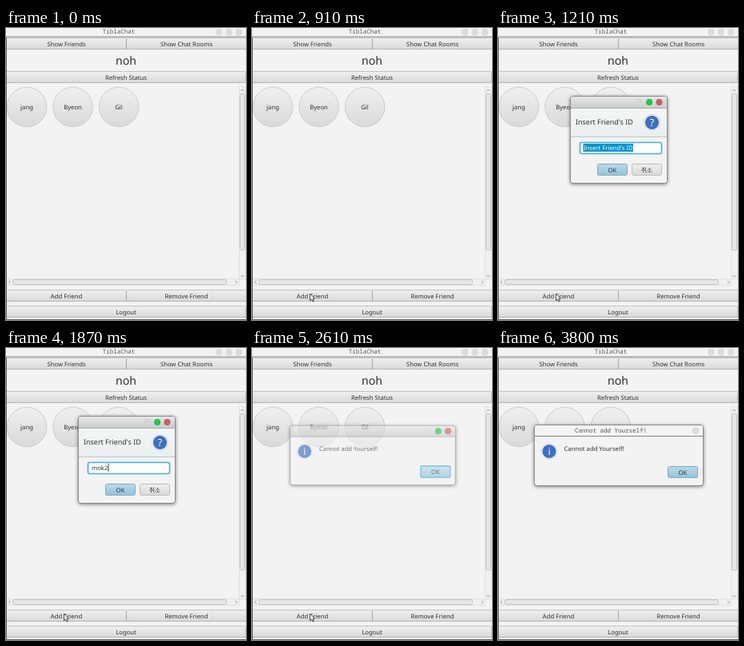
An HTML page for the animation above (3890 ms loop, 300 px wide and 366 px high).

```html
<!DOCTYPE html>
<html lang="en">
<head>
<meta charset="utf-8">
<title>Add friend</title>
<style>
  html, body { margin: 0; width: 100%; height: 100%; overflow: hidden; background: #f3f3f3; }
  svg { display: block; width: 300px; height: 366px; }
  text {
    font: 7.7px "Noto Sans", "Noto Sans CJK KR", sans-serif;
    fill: #333; white-space: pre; text-rendering: geometricPrecision;
  }
  text.mono { font-family: "Noto Sans Mono", monospace; font-size: 7.5px; fill: #555; }
  text.name { font-size: 14.4px; fill: #333; }
  text.head { font-size: 8.95px; }
  text.sign { font-size: 12.5px; font-weight: 500; fill: #fff; }
  .dialog { filter: drop-shadow(0 1px 2px rgba(0, 0, 0, .5)); }
</style>
</head>
<body>
<svg id="stage" viewBox="0 0 300 366">
  <defs>
    <linearGradient id="grey" x2="0" y2="1"><stop stop-color="#f0f0f0"/><stop offset="1" stop-color="#d9d9d9"/></linearGradient>
    <linearGradient id="blue" x2="0" y2="1"><stop stop-color="#b9dbea"/><stop offset="1" stop-color="#92c3dc"/></linearGradient>
    <linearGradient id="bar" x2="0" y2="1"><stop stop-color="#e6e6e6"/><stop offset="1" stop-color="#c9cccb"/></linearGradient>
    <linearGradient id="header" x2="0" y2="1"><stop stop-color="#f4f6f6"/><stop offset="1" stop-color="#e9eeee"/></linearGradient>
  </defs>
</svg>
<script>
const LOOP = 3890;
const stage = document.getElementById('stage');
const $ = id => document.getElementById(id);

const rect = (x, y, w, h, fill, stroke = 'none', r = 0, extra = '') =>
  `<rect x="${x}" y="${y}" width="${w}" height="${h}" rx="${r}" fill="${fill}" stroke="${stroke}" ${extra}/>`;
const circle = (x, y, r, fill, stroke = 'none') =>
  `<circle cx="${x}" cy="${y}" r="${r}" fill="${fill}" stroke="${stroke}"/>`;
const label = (x, y, string, cls = '', anchor = 'middle') =>
  `<text x="${x}" y="${y}" class="${cls}" text-anchor="${anchor}">${string}</text>`;
const line = (d, color, width = 1) =>
  `<path d="${d}" fill="none" stroke="${color}" stroke-width="${width}"/>`;

const button = (x, y, w, h, string, fill = 'url(#grey)', stroke = '#c2c2c2', r = 1) =>
  rect(x + .5, y + .5, w - 1, h - 1, fill, stroke, r) + label(x + w / 2, y + h / 2 + 3, string);

const wideButton = (x, y, w, string) =>
  button(x, y, w, 15, string) + line(`M${x} ${y + 14.5}h${w}`, '#b6b6b6');

const friend = (x, name) => circle(x, 99, 24.8, 'url(#grey)', '#cdcdcd') + label(x, 102, name);

// A title bar is coloured and untitled with focus, plain and titled without.
function titleBar(id, x, y, w, h, title, lastX, plainDots) {
  const cy = y + h / 2 - .5;
  const dots = colors => colors.map((c, i) =>
    circle(lastX - 12.4 * (colors.length - 1 - i), cy, 4, c, 'rgba(90,90,90,.06)')).join('');
  const shape = fill => `<path d="M${x} ${y + h}v${3 - h}q0-3 3-3h${w - 6}q3 0 3 3v${h - 3}z" fill="${fill}"/>`;
  const edge = color => line(`M${x} ${y + h - .5}h${w}`, color);
  return `<g id="${id}On">${shape('url(#bar)')}${edge('#a5aaa9')}${dots(['#d5d8d7', '#1fc645', '#c8605c'])}</g>
    <g id="${id}Off">${shape('#f3f3f3')}${edge('#858585')}${label(141, cy + 2.2, title, 'mono')}
    ${dots(Array(plainDots).fill('#dcdcdc'))}</g>`;
}

const icon = (x, y, sign) =>
  circle(x, y, 9.8, '#fff', '#cfd4da') + circle(x, y, 8.6, '#3d6fc0') + label(x, y + 4.5, sign, 'sign');

const mainWindow =
  rect(0, 0, 300, 366, '#f3f3f3') +
  titleBar('main', 0, 0, 300, 11.5, 'TiblaChat', 291, 3) +
  wideButton(0, 12, 151, 'Show Friends') + wideButton(150, 12, 151, 'Show Chat Rooms') +
  label(150, 46, 'noh', 'mono name') +
  wideButton(0, 54, 300, 'Refresh Status') +
  friend(26, 'jang') + friend(83.5, 'Byeon') + friend(141, 'Gil') +
  rect(291.5, 73.5, 8, 241, '#f0f0f0', '#e2e2e2') +
  rect(292.5, 82.5, 6, 196, '#e6e6e6', '#c4c4c4', 2) +
  rect(.5, 314.5, 291, 8, '#f0f0f0', '#e2e2e2') +
  rect(8.5, 315.5, 267, 6, '#e6e6e6', '#c4c4c4', 2) +
  line('M293.5 79l2-2 2 2M293.5 310l2 2 2-2M5.5 316.5l-2 2 2 2M287 316.5l2 2-2 2', '#808080', .8) +
  wideButton(0, 328, 151, 'Add Friend') + wideButton(150, 328, 151, 'Remove Friend') +
  wideButton(0, 348, 300, 'Logout') +
  line('M150.5 13v13M150.5 329v13', '#a6a6a6') +
  line('M.5 12V365.5H300', '#666');

const askDialog = `<g id="ask" class="dialog">` +
  rect(90.5, 85.5, 121, 109, '#f3f3f3', '#8b8b8b', 3) +
  titleBar('ask', 91, 86, 120, 15, '', 201.5, 1) +
  rect(91, 101, 120, 36, 'url(#header)') + line('M91 136.5h120', '#c3c6c6') +
  label(97, 121.3, "Insert Friend's ID", 'head', 'start') + icon(192.5, 118.3, '?') +
  rect(102.5, 143.5, 102, 14, '#fff', '#45afd6', 2, 'stroke-width="1.6"') +
  rect(106.5, 145, 62.5, 10, '#0093c8', 'none', 0, 'id="selection"') +
  `<text id="field" x="107" y="153"></text>` +
  `<rect id="caret" y="145" width=".9" height="10" fill="#333"/>` +
  button(124, 170, 38, 15, 'OK', 'url(#blue)', '#83aabd', 2) +
  button(167, 170, 38, 15, '취소', 'url(#grey)', '#bcbcbc', 2) + '</g>';

const noticeDialog = `<g id="notice" class="dialog">` +
  rect(45.5, 96.5, 211, 76, '#f3f3f3', '#8b8b8b', 3) +
  titleBar('notice', 46, 97, 210, 14, 'Cannot add Yourself!', 247, 1) +
  icon(64, 129.5, 'i') + label(82.5, 128.8, 'Cannot add Yourself!', '', 'start') +
  button(212, 148, 38, 15, 'OK', 'url(#blue)', '#83aabd', 2) +
  rect(212, 148, 38, 15, 'none', '#4db3d8', 2, 'id="ring" stroke-width="1.3"') + '</g>';

const pointer = `<path id="pointer" d="M0 0V8.5L2 6.8L3.4 10L4.9 9.3L3.5 6.2H6Z"
  fill="#fff" stroke="#222" stroke-width=".8"/>`;

stage.insertAdjacentHTML('beforeend', mainWindow + askDialog + noticeDialog + pointer);

const show = (id, on) => $(id).style.display = on ? '' : 'none';
const clamp = v => Math.min(1, Math.max(0, v));
const smooth = u => u * u * (3 - 2 * u);

function setFocus(id, on) {
  show(id + 'On', on);
  show(id + 'Off', !on);
}

// Fades and scales a dialog about its centre.
function reveal(id, cx, cy, left) {
  show(id, left < 1);
  const scale = 1 - .1 * left ** 3;
  $(id).setAttribute('opacity', 1 - left ** 2);
  $(id).setAttribute('transform', `translate(${cx} ${cy}) scale(${scale}) translate(${-cx} ${-cy})`);
}

const route = [[70, 182, 309], [360, 56, 349], [570, 72.5, 333], [3095, 72.5, 333], [3310, 190, 296]];

function movePointer(t) {
  const i = route.findIndex(([time]) => t < time);
  show('pointer', i > 0);
  if (i < 1) return;
  const [[t0, x0, y0], [t1, x1, y1]] = [route[i - 1], route[i]];
  const u = smooth((t - t0) / (t1 - t0));
  $('pointer').setAttribute('transform', `translate(${x0 + (x1 - x0) * u} ${y0 + (y1 - y0) * u})`);
}

function typeField(t) {
  const typing = t >= 1410;
  const count = [1410, 1580, 1730, 1870].filter(time => t >= time).length;
  const field = $('field');
  field.textContent = typing ? 'mok2'.slice(0, count) : "Insert Friend's ID";
  field.style.fill = typing ? '#333' : '#fff';
  show('selection', !typing);
  show('caret', typing);
  if (typing) $('caret').setAttribute('x', 107.3 + field.getComputedTextLength());
}

function draw(t) {
  setFocus('main', t >= 620 && t < 890 || t >= 2400 && t < 2510);
  setFocus('ask', t < 2400);
  setFocus('notice', t < 3800);
  show('ring', t < 3800);
  typeField(t);
  reveal('ask', 151, 140, t < 2360 ? 1 - clamp((t - 940) / 270) : clamp((t - 2340) / 150));
  reveal('notice', 151, 134.5, 1 - clamp((t - 2510) / 250));
  movePointer(t);
}

const start = performance.now();
function tick() {
  draw((performance.now() - start) % LOOP);
  requestAnimationFrame(tick);
}
tick();
</script>
</body>
</html>
```
